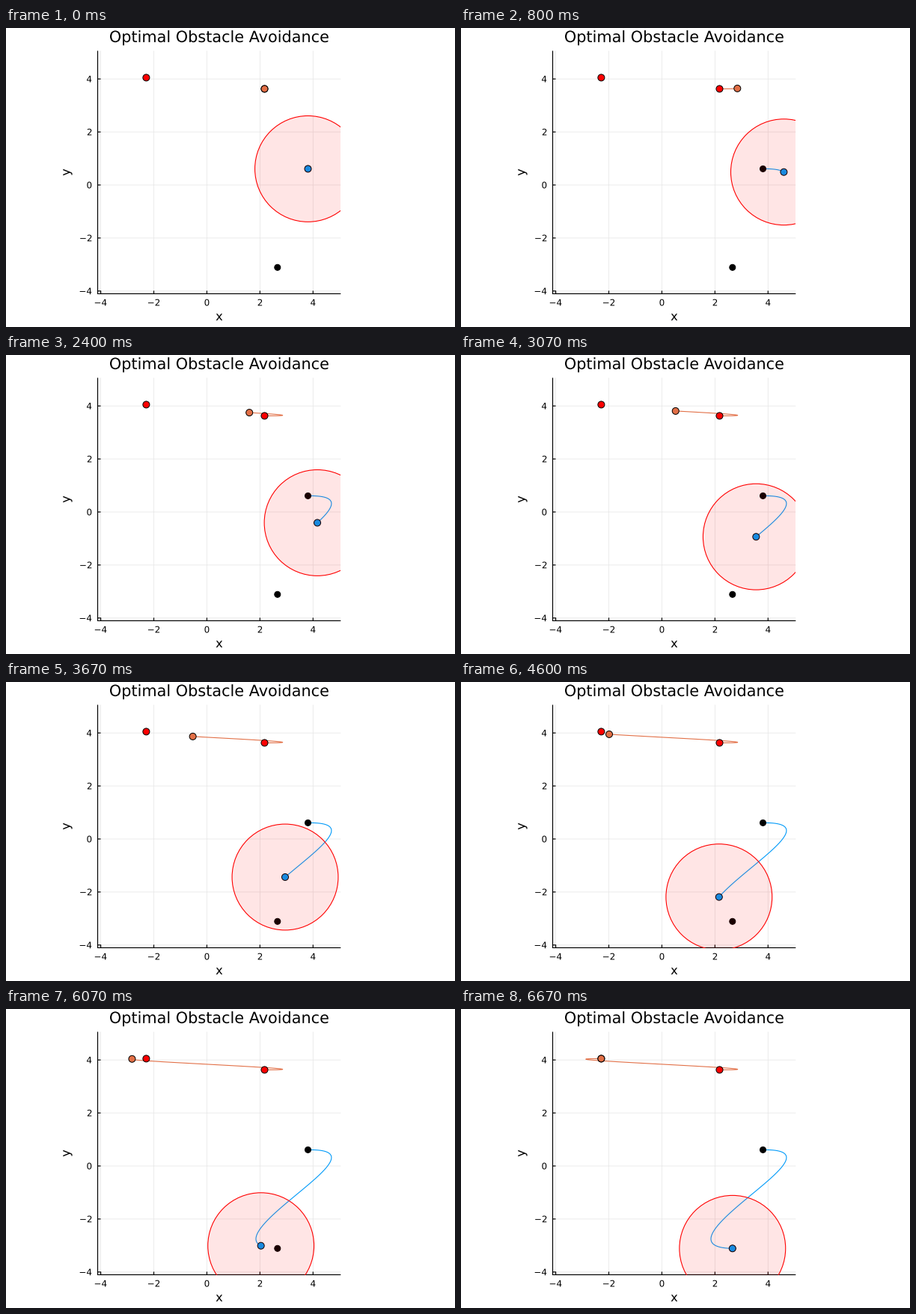
Write a matplotlib script that moves like this. It is 600 by 400 pixels and loops after 6740 ms.

```python
import numpy as np
import matplotlib.pyplot as plt
from matplotlib.animation import FuncAnimation
from matplotlib.colors import to_rgba
from matplotlib.patches import Circle, PathPatch
from matplotlib.path import Path
from matplotlib.textpath import TextPath
from matplotlib.transforms import Affine2D

plt.rcParams["font.family"] = "DejaVu Sans"

W, H, DPI = 600, 400, 100
PT = 72 / DPI                      # points per pixel
UNIT = 35.46                       # pixels per data unit
LEFT, TOP, RIGHT, BOTTOM = 122.5, 30.5, 447.3, 355.5
CENTER = (LEFT + RIGHT) / 2
BLUE, ORANGE = "#009af9", "#e26f46"

STEPS = 100                        # states per trajectory
TICK, LOOP = 20, 6740              # ms
STATES_PER_TICK = 0.3              # 15 states per second

# polynomial coefficients in pixels, lowest power first, time from 0 to 1
RUNNER = ([345.5, 370.0, -1553.7, 1025.6], [81.4, 0.45, -45.45, 30.0])
OBSTACLE = ([403.5, 366.7, -1217.6, 828.2, -18.0],
            [188.4, -5.6, 369.7, -199.2, -33.0])


def px(x):
    return 268.45 + UNIT * x


def py(y):
    return 210.0 - UNIT * y


def path(agent, t):
    return [np.polynomial.polynomial.polyval(t, c) for c in agent]


fig = plt.figure(figsize=(W / DPI, H / DPI), dpi=DPI, facecolor="white")
ax = fig.add_axes([0, 0, 1, 1])
ax.set_xlim(0, W)
ax.set_ylim(H, 0)
ax.axis("off")


def line(xs, ys, color="black", width=1.2, z=1):
    return ax.plot(xs, ys, color=color, lw=width * PT, zorder=z,
                   solid_capstyle="butt", snap=False)[0]


def label(x, y, text, size, align=0.5, turn=0):
    """Outline text with its baseline at y; align 0 is left, 1 is right."""
    glyphs = TextPath((0, 0), text, size=size)
    box = glyphs.get_extents()
    place = Affine2D().translate(-box.x0 - align * box.width, 0)
    place.scale(1, -1).rotate_deg(-turn).translate(x, y)
    ax.add_patch(PathPatch(place.transform_path(glyphs), fc="black",
                           lw=0, snap=False, zorder=1))


def dot(center, color, z, edge="black", radius=4.5):
    return ax.add_patch(Circle(center, radius, fc=color, ec=edge,
                               lw=1.0 * PT, zorder=z))


def draw_axes():
    for v in range(-4, 5, 2):
        x, y = px(v), py(v)
        name = str(v).replace("-", "\u2212")
        line([x, x], [TOP, BOTTOM], "#e6e6e6", 0.75, 0)
        line([LEFT, RIGHT], [y, y], "#e6e6e6", 0.75, 0)
        line([x, x], [BOTTOM, BOTTOM - 4])
        line([LEFT, LEFT + 4], [y, y])
        label(x, 371.5, name, 11.9)
        label(114.3, y + 4.4, name, 11.9, align=1)
    line([LEFT, LEFT], [TOP, BOTTOM + 0.5])
    line([LEFT - 0.5, RIGHT], [BOTTOM, BOTTOM])
    label(CENTER, 18.9, "Optimal Obstacle Avoidance", 20.8)
    label(CENTER, 391.2, "x", 16.3)
    label(85.2, 193, "y", 16.3, turn=90)


draw_axes()

trails, heads = [], []
for agent, color, end_color, radius in ((RUNNER, ORANGE, "red", 4.5),
                                        (OBSTACLE, BLUE, "black", 4.0)):
    trails.append((agent, line([], [], color, 1.1, 2)))
    for t in (0, 1):
        dot(path(agent, t), end_color, 3, radius=radius)
    heads.append(dot(path(agent, 0), color, 4))

# the danger zone lies over everything and tints it
zone = ax.add_patch(Circle((0, 0), 2 * UNIT, fc=to_rgba("red", 0.1),
                           ec="red", lw=1.1 * PT, zorder=5))
corners = [(LEFT, TOP), (RIGHT, TOP), (RIGHT, BOTTOM), (LEFT, BOTTOM),
           (LEFT, TOP)]
zone.set_clip_path(Path(corners, closed=True), ax.transData)


def update(frame):
    k = int((frame + 0.5) * STATES_PER_TICK)
    t = np.arange(k + 1) / STEPS
    for (agent, trail), head in zip(trails, heads):
        xs, ys = path(agent, t)
        trail.set_data(xs, ys)
        head.center = xs[-1], ys[-1]
    zone.center = heads[1].center
    return [trail for _, trail in trails] + heads + [zone]


anim = FuncAnimation(fig, update, frames=LOOP // TICK, interval=TICK,
                     init_func=lambda: update(0), repeat=True,
                     repeat_delay=0, blit=False)
plt.show()
```
